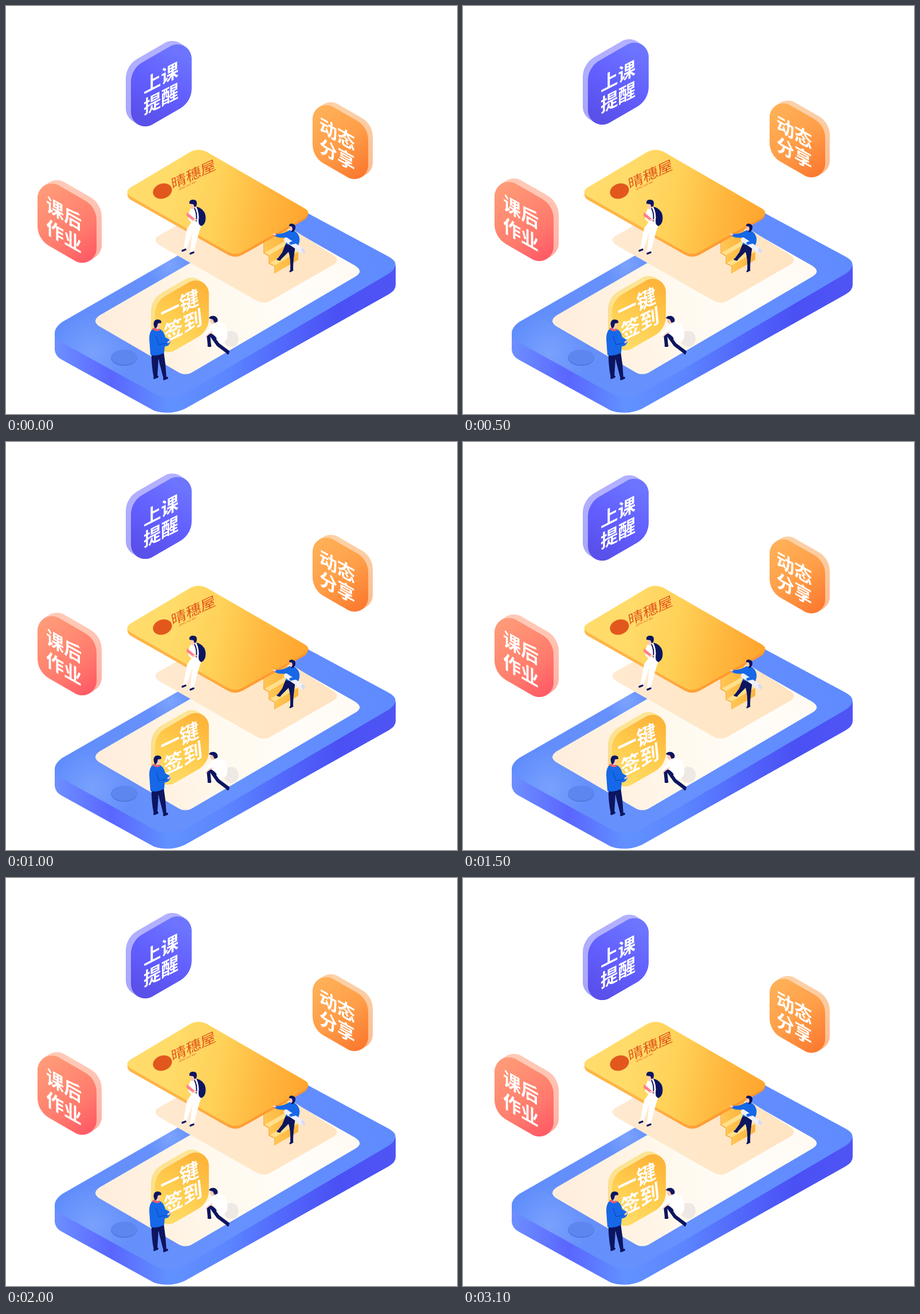
Write an HTML page with a canvas that moves like this. It is 787 by 712 pixels and loops after 3.5 s.

```html
<!DOCTYPE html>
<html lang="zh-CN">
<head>
<meta charset="utf-8">
<style>
html, body { margin: 0; width: 100%; height: 100%; overflow: hidden; background: #fff; }
canvas { display: block; width: 787px; height: 712px; }
</style>
</head>
<body>
<canvas id="stage" width="787" height="712"></canvas>
<script>
const ctx = document.getElementById('stage').getContext('2d');
const NAVY = '#0c1560', BLUE = '#1668e8', SKIN = '#ffc9b5';
const CJK = '"Noto Sans CJK SC", "Noto Sans CJK", sans-serif';

function grad(x0, y0, x1, y1, ...colors) {
  const g = ctx.createLinearGradient(x0, y0, x1, y1);
  colors.forEach((c, i) => g.addColorStop(i / (colors.length - 1), c));
  return g;
}

function fill(d, color) {
  ctx.fillStyle = color;
  ctx.fill(new Path2D(d));
}

function stroke(d, color, width) {
  ctx.strokeStyle = color;
  ctx.lineWidth = width;
  ctx.lineCap = ctx.lineJoin = 'round';
  ctx.stroke(new Path2D(d));
}

function oval(x, y, rx, ry, color, turn = 0) {
  ctx.fillStyle = color;
  ctx.beginPath();
  ctx.ellipse(x, y, rx, ry, turn, 0, 7);
  ctx.fill();
}

function glow(d, x, y, r, alpha) {
  const g = ctx.createRadialGradient(x, y, 0, x, y, r);
  g.addColorStop(0, `rgba(150,185,255,${alpha})`);
  g.addColorStop(1, 'rgba(150,185,255,0)');
  fill(d, g);
}

function phone() {
  const top = 'M97 552L430 361L505 350L667 437Q692 450 668 467L312 676Q286 690 260 677L97 587Q73 571 97 552Z';
  fill('M85 570V600Q86 611 97 617L258 706Q286 715 312 703L668 503Q680 496 680 487V453Z',
    grad(85, 0, 680, 0, '#6d8fff', '#5a66ff', '#6191ff', '#5c86ff', '#5268fb', '#4a50f4', '#4f55f4'));
  fill(top, grad(85, 570, 680, 450, '#5f8dfc', '#6690fb', '#6691ff', '#628dff', '#5f8bff'));
  glow(top, 150, 605, 70, 0.45);
  glow(top, 285, 452, 40, 0.45);
  fill('M163 540L440 380Q470 366 500 391L609 453Q625 463 610 472L327 638Q313 647 299 638L163 559Q149 550 163 540Z',
    grad(156, 560, 617, 460, '#ffeddc', '#fff2e2', '#fffaf0', '#fffdf8', '#fffaf3'));
  oval(206, 614, 23, 14, '#5179df');
  oval(206, 613, 22.5, 13, '#5d87ee');
}

function plate() {
  fill('M266 401L400 326L570 434Q585 443 570 452L464 513Q450 522 435 513L267 417Q255 408 266 401Z',
    grad(261, 0, 578, 0, '#ffe9d0', '#ffe7c8', '#ffe4c2'));
}

function stairs() {
  for (const [x, y, h] of [[451, 411, 20], [460, 434, 15], [470, 452, 14]]) {
    fill(`M${x} ${y}l40 -23v${h}l-40 23z`, grad(x, 0, x + 40, 0, '#ffc653', '#fdb43d'));
    if (x < 470) fill(`M${x} ${y + h}l40 -23l10 5l-40 23z`, '#ffe08c');
  }
  stroke('M450 411V431L459 436V449L469 454V466', '#f9ac38', 1.5);
}

function card() {
  fill('M212 324V330Q212 335 219 339L387 434Q400 441 413 434L521 373Q527 369 527 362Z',
    grad(212, 0, 527, 0, '#ffb647', '#ffb347', '#ff9c32', '#ff9330'));
  fill('M217 317L321 255Q336 247 351 255L521 353Q534 361 521 369L413 429Q400 436 387 429L217 332Q206 325 217 317Z',
    grad(212, 310, 527, 370, '#ffdc6b', '#ffdb69', '#ffd158', '#ffb83f', '#ffa42d'));

  oval(273, 323, 17, 13, '#e2581c', -0.35);
  ctx.save();
  ctx.transform(0.95, -0.44, 0.15, 0.85, 290, 320);
  ctx.fillStyle = '#e2581c';
  ctx.textAlign = 'left';
  ctx.textBaseline = 'alphabetic';
  ctx.font = '400 27px ' + CJK;
  ctx.fillText('晴穗屋', 0, 0);
  ctx.font = '5px "Noto Sans", sans-serif';
  ctx.fillText('QING SUI WU', 11, 8);
  ctx.restore();
}

// Rounded isometric tile; dir is -1 when the face rises to the right.
function tile(o, dy) {
  const { x, w, top, bottom, r, dir, depth, lift } = o;
  const cx = x + w / 2, cy = (top + bottom) / 2;
  const skew = w * 0.577;
  const h = bottom - top - skew + 1.464 * r;
  const left = -dir * skew / 2;
  const wide = r * 1.6;
  const corners = [
    [-w / 2, left - h / 2, dir < 0 ? wide : r],
    [w / 2, -left - h / 2, dir < 0 ? r : wide],
    [w / 2, -left + h / 2, dir < 0 ? wide : r],
    [-w / 2, left + h / 2, dir < 0 ? r : wide]
  ];
  const face = (ox, oy, color) => {
    ctx.save();
    ctx.translate(cx + ox, cy + oy);
    ctx.fillStyle = color;
    ctx.beginPath();
    ctx.moveTo(-w / 2, left);
    corners.forEach(([px, py, radius], i) => {
      const [nx, ny] = corners[(i + 1) % 4];
      ctx.arcTo(px, py, nx, ny, radius);
    });
    ctx.fill();
    ctx.restore();
  };
  ctx.save();
  ctx.translate(0, dy);
  const edge = grad(0, -h / 2, 0, h / 2, ...o.edge);
  for (let i = 12; i > 0; i--) face(depth * i / 12, -lift * i / 12, edge);
  face(0, 0, grad(-w * o.lean, -h / 2, w * o.lean, h / 2, ...o.face));

  ctx.fillStyle = '#fff';
  ctx.font = `bold ${o.size}px ${CJK}`;
  ctx.textAlign = 'center';
  ctx.textBaseline = 'alphabetic';
  for (const [line, tx, ty] of o.lines) {
    ctx.save();
    ctx.transform(0.9, dir * o.slope, o.slant || 0, 0.95, tx, ty);
    ctx.fillText(line, 0, o.size * 0.38);
    ctx.restore();
  }
  ctx.restore();
}

const floaters = [
  { x: 218, w: 106, top: 67, bottom: 210, r: 25, dir: -1, depth: -9, lift: 6, lean: -0.3,
    edge: ['#b3b1ff', '#a9a8f8'], face: ['#6d75ff', '#625fff', '#5a50ea'],
    size: 34, slope: 0.46, lines: [['上课', 270.5, 125], ['提醒', 270.5, 162]] },
  { x: 535, w: 97, top: 173, bottom: 302, r: 24, dir: 1, depth: 8, lift: 5, lean: 0.4,
    edge: ['#fdd0a6', '#fdbd90'], face: ['#ffb057', '#ff9f49', '#fb7b31'],
    size: 34.5, slope: 0.5, lines: [['动态', 578, 223], ['分享', 578, 259]] },
  { x: 55, w: 103, top: 310, bottom: 448, r: 25, dir: 1, depth: 9, lift: 6, lean: 0.4,
    edge: ['#ffc9b6', '#ffb1a5'], face: ['#ff9a78', '#ff8b72', '#ff7a6d', '#ff5d66'],
    size: 34.5, slope: 0.51, lines: [['课后', 101, 362], ['作业', 101, 401]] }
];
const checkIn = {
  x: 260, w: 94, top: 479, bottom: 604, r: 23, dir: -1, depth: -7, lift: 5, lean: -0.3,
  edge: ['#fde596', '#fbd983'], face: ['#fdb53a', '#ffcb4c', '#ffdb66'],
  size: 37, slope: 0.43, slant: 0.1, lines: [['一键', 303, 522], ['签到', 309, 557]]
};

function reader() {
  fill('M326 374L316 388L309 426L314 427L325 396L321 430L327 431L337 394L342 380Z', '#fff');
  fill('M322 354Q318 361 318 372L326 380L342 381Q348 365 339 354L331 350Z', '#fff');
  fill('M332 350Q345 353 348 365Q350 380 341 384Q336 383 336 375Q338 362 332 350Z', NAVY);
  stroke('M329 353Q334 362 332 375', NAVY, 2);
  oval(326, 349, 4, 5.5, SKIN);
  fill('M320 345Q319 339 325 338Q333 337 333 344Q333 351 329 351L327 346Z', NAVY);
  fill('M316 360L329 371L327 375L315 366Z', '#ff7f8c');
  stroke('M332 373L325 374', SKIN, 2.5);
  stroke('M313 425L308 427', NAVY, 3.5);
  stroke('M327 430L322 432', NAVY, 3.5);
}

function climber() {
  fill('M488 415L505 419Q501 442 501 461L496 462Q497 440 493 429L478 444L474 441L482 430Z', NAVY);
  stroke('M500 461L496 463', NAVY, 3);
  stroke('M478 443L474 442', NAVY, 3);
  fill('M468 397Q481 400 495 391Q506 390 511 401Q514 408 510 418L488 416Q490 408 488 404Q477 406 468 401Z', BLUE);
  stroke('M470 399L467 398', SKIN, 3);
  stroke('M489 408L517 427', '#eef0fb', 8);
  oval(518.5, 427, 3, 4.5, '#d9dcf0', -0.5);
  stroke('M507 402L509 411L497 414', BLUE, 5);
  oval(499, 387, 4.5, 6, SKIN);
  fill('M494 384Q494 379 500 380Q506 381 505 388Q503 396 497 394L500 390L499 385Z', NAVY);
}

function pointer() {
  fill('M254 602L275 602Q279 626 280 650L275 651L266 616L264 648L258 649Q253 625 254 602Z', NAVY);
  stroke('M264 647L259 649', NAVY, 4);
  stroke('M281 649L276 651', NAVY, 4);
  fill('M257 563Q250 567 250 581L252 609Q264 612 276 605L277 594Q285 594 288 584L278 578Q275 565 266 563Z', BLUE);
  stroke('M262 577L267 591L279 589', '#0c51c6', 1.5);
  stroke('M283 587L287 584', SKIN, 3);
  oval(264, 557, 5, 7, SKIN);
  stroke('M257 563Q262 567 267 565', '#ff5c62', 3);
  fill('M258 558Q256 548 264 547Q272 547 271 553L265 554Q264 562 260 563Z', NAVY);
}

function croucher() {
  oval(393, 581, 13, 14, 'rgba(190,185,195,.25)');
  stroke('M366 578L353 572L355 592', NAVY, 6);
  stroke('M360 577L370 591L386 603', NAVY, 6);
  stroke('M357 593L353 593', NAVY, 3);
  stroke('M388 603L387 606', NAVY, 4);
  fill('M362 554Q373 548 381 555Q388 566 386 580Q380 591 371 587Q366 574 357 571L347 578L346 573Q354 563 362 554Z', '#fff');
  stroke('M360 569Q354 571 349 577', SKIN, 2);
  oval(361, 549, 5, 5.5, SKIN);
  fill('M354 545Q356 540 364 541Q371 544 369 551L364 553L361 547Z', NAVY);
}

const heights = [0, -3, -6, -3, 0, 3, 3];

function draw(now) {
  const dy = heights[Math.floor(now / 500) % heights.length];
  ctx.fillStyle = '#fff';
  ctx.fillRect(0, 0, 787, 712);
  phone();
  plate();
  stairs();
  card();
  floaters.forEach(o => tile(o, dy));
  tile(checkIn, dy);
  reader();
  climber();
  pointer();
  croucher();
}

const start = performance.now();
(function loop() {
  draw(performance.now() - start);
  requestAnimationFrame(loop);
})();
</script>
</body>
</html>
```
